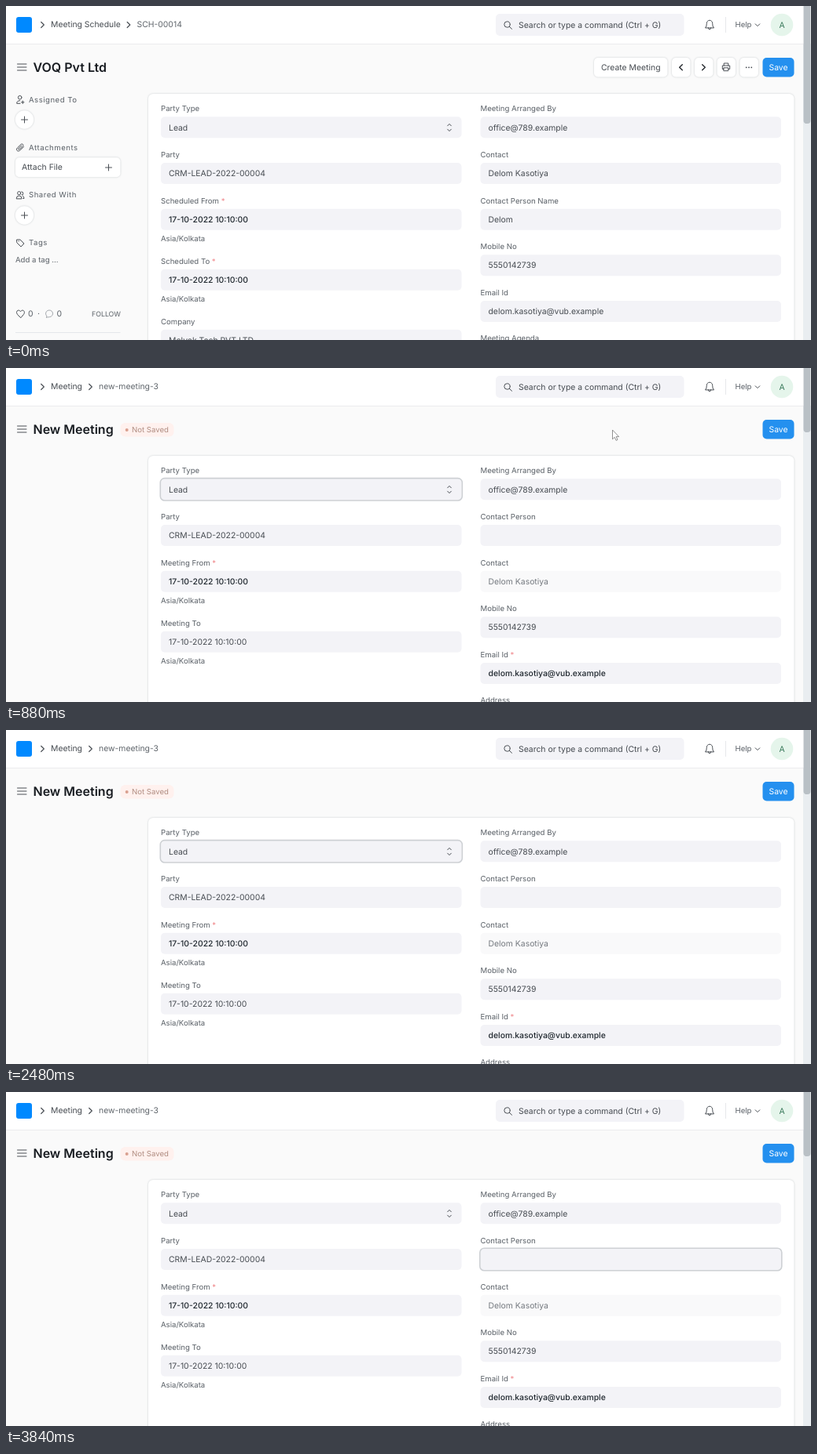
Recreate the animation shown at these times as an HTML page. Size 1024 px wide and 426 px high, loop 3.92 s.

```html
<!DOCTYPE html>
<html lang="en">
<head>
<meta charset="utf-8">
<title>Create meeting</title>
<style>
  html, body { margin: 0; width: 100%; height: 100%; overflow: hidden; }
  svg { display: block; width: 1024px; height: 426px; background: #fafafa; }
  text { font-family: Inter, sans-serif; white-space: pre; text-rendering: geometricPrecision; }
  .icon { fill: none; stroke: #4a4f55; stroke-width: 1; stroke-linecap: round; stroke-linejoin: round; }
  .card { fill: #fff; filter: drop-shadow(0 .5px 1px rgba(25, 39, 52, .22)); }
  .ring { fill: none; stroke: #cdd0d4; stroke-width: 1.6; }
</style>
</head>
<body>
<svg id="stage" viewBox="0 0 1024 426"></svg>
<script>
const LOOP = 3920, PAGE_SWITCH = 800, FOCUS_SWITCH = 3600;
const LEFT = 197, RIGHT = 603.5;
const INK = '#1f272e', BODY = '#464b51', LABEL = '#5a6067', MUTED = '#74797f', FIELD = '#f3f3f7';

// Text is placed by the vertical centre of its capitals.
const text = (x, y, str, size = 10.4, fill = BODY, extra = '') =>
  `<text x="${x}" y="${y + size * .36}" font-size="${size}" fill="${fill}" ${extra}>${str}</text>`;
const rect = (x, y, w, h, r, fill) =>
  `<rect x="${x}" y="${y}" width="${w}" height="${h}" rx="${r}" fill="${fill}"/>`;
const icon = (x, y, d, style = '') =>
  `<path class="icon" transform="translate(${x} ${y})" d="${d}" style="${style}"/>`;
const card = (x, y, w, h, r = 5) => `<rect class="card" x="${x}" y="${y}" width="${w}" height="${h}" rx="${r}"/>`;
const plus = (x, y) => icon(x, y, 'M-4 0H4M0-4V4');
const chevron = (x, y, dir = 1, style = 'stroke-width:1.2') =>
  icon(x, y, `M${-dir * 1.8}-3.5L${dir * 1.8} 0L${-dir * 1.8} 3.5`, style);
const title = str => text(34.5, 78, str, 16, '#171b20', 'font-weight="600"');

function label(x, y, str) {
  const html = str.replace('*', '<tspan fill="#f08a8e">*</tspan>');
  return text(x, y, html, 9.6, LABEL);
}

function field(x, y, name, value, { ink = BODY, fill = FIELD, note = '' } = {}) {
  return label(x, y - 10.7, name) + rect(x, y, 382.5, 27, 5, fill) +
    text(x + 10, y + 13.5, value, 10.4, ink, ink === INK ? 'font-weight="500"' : '') +
    (note && text(x, y + 37.3, note, 9.6, LABEL));
}

const ring = (id, x, y) => `<rect id="${id}" class="ring" x="${x - .7}" y="${y - .7}" width="384" height="28.4" rx="5.5"/>`;

function breadcrumbs(parent, page, pageX) {
  return text(57, 23.7, parent) + chevron(pageX - 10.5, 24) + text(pageX, 23.7, page, 10.4, '#5f656b');
}

const scrollThumb = h => rect(1014.5, -5, 9, h + 5, 4, '#b9c0c5');

function header() {
  return rect(0, 0, 1024, 48, 0, '#fff') + rect(0, 48, 1014, 1, 0, '#ececee') +
    rect(13, 14, 20, 20, 3, '#0089ff') + chevron(46.5, 24) +
    rect(623, 10, 239.5, 28, 5, FIELD) +
    icon(638, 23.5, 'M3.2 0A3.7 3.7 0 1 1-4.2 0A3.7 3.7 0 1 1 3.2 0M2.3 2.8L5.5 5.8') +
    text(652, 24, 'Search or type a command (Ctrl + G)') +
    icon(895, 24, 'M-5.2 3.7Q-3.7 2.5-3.7-1.5C-3.7-7.2 3.7-7.2 3.7-1.5Q3.7 2.5 5.2 3.7ZM-1.6 3.8Q-1.5 6 0 6T1.6 3.8') +
    rect(915, 14, 1, 20, 0, '#e6e8eb') + text(927.5, 24, 'Help', 9.6, LABEL) +
    icon(956, 24.3, 'M-2.8-1.4L0 1.4L2.8-1.4') +
    '<circle cx="987" cy="24" r="14.3" fill="#e5f5eb"/>' +
    text(987, 24.2, 'A', 10.4, '#38785a', 'text-anchor="middle"') +
    icon(20, 78, 'M-5.5-4H6M-5.5 0H6M-5.5 4H6');
}

function save() {
  return rect(962.5, 66, 40, 24.5, 5, '#2490ef') + text(982.5, 78, 'Save', 10.4, '#fff', 'text-anchor="middle"');
}

function toolbar() {
  const bold = 'stroke:#25292e;stroke-width:1.4';
  return card(748, 66, 93.5, 24.5) + text(757, 78, 'Create Meeting') +
    [847, 876, 904.5, 933.5].map(x => card(x, 66, 23.5, 24.5)).join('') +
    chevron(858.5, 78.3, -1, bold) + chevron(887.5, 78.3, 1, bold) +
    icon(916, 78, 'M-2.8-2V-5H2.8V-2M-2.8 2.5H-4.7V-2H4.7V2.5H2.8M-2.8 .8H2.8V4.7H-2.8Z') +
    [-3.3, 0, 3.3].map(dx => `<circle cx="${945 + dx}" cy="78.3" r=".9" fill="${BODY}"/>`).join('');
}

function sidebar() {
  const head = (y, str) => text(29, y, str, 9.6, LABEL, 'letter-spacing=".5"');
  const addButton = y => `<circle class="card" cx="23.5" cy="${y}" r="11.7"/>` + plus(23.5, y);
  return head(119.5, 'Assigned To') + head(180.5, 'Attachments') + head(241, 'Shared With') + head(302, 'Tags') +
    icon(18, 119.5, 'M2-2.8A2.3 2.3 0 1 1-2.6-2.8A2.3 2.3 0 1 1 2 -2.8M0 4.8H-4.3Q-4.3 1.2-.3 1.2M1.5 3.3H5M3.3 1.5V5') +
    icon(18, 180.5, 'M4.5-1L-.5 3.8C-3 6-6 3-3.7 .6L1-4C3-5.6 5-3.2 3.3-1.6L-.8 2.3C-2 3.2-3 2-2 1L1.8-2.5') +
    icon(18, 241, 'M.8-2.3A2.1 2.1 0 1 1-3.4-2.3A2.1 2.1 0 1 1 .8-2.3M-4.8 4.5Q-4.8 1-1.3 1T2 4.5ZM1.8-4.2Q4.2-4 3.8-1.5T2-.2M3.3 1Q5 2 5 4.5H3.8') +
    icon(18, 302, 'M-4-4H0L5 1L1 5L-4 0ZM-1.8-2.2V-1.8') +
    addButton(145) + addButton(267) +
    card(12, 193.3, 133.5, 25) + text(20, 205.7, 'Attach File') + plus(130.5, 206) +
    text(12, 323.5, 'Add a tag ...', 9.6, LABEL) +
    icon(18.5, 392.5, 'M0 5L-4 .8C-7-3-2.5-6.5 0-2.8C2.5-6.5 7-3 4 .8Z') +
    text(28, 392.5, '0', 10.4, LABEL) + text(40, 392.5, '·', 10.4, LABEL) +
    icon(55, 392.5, 'M-3.5 4.5L-3.2 2.8A4.5 4.3 0 1 1 .4 4.1Q-1.2 4.5-3.5 4.5Z', 'stroke:#a3a7ac') +
    text(64.5, 392.5, '0', 10.4, LABEL) + text(109, 392.5, 'FOLLOW', 8.8, LABEL) +
    rect(12, 416, 133.5, 1, 0, '#e4e7ea');
}

// Parts of the form that both documents share.
function form() {
  return card(181, 112, 821.5, 330, 6) +
    field(LEFT, 141.3, 'Party Type', 'Lead') +
    icon(564, 155, 'M-2.3-2.2L0-4.6L2.3-2.2M-2.3 2.2L0 4.6L2.3 2.2') +
    field(LEFT, 200, 'Party', 'CRM-LEAD-2022-00004') +
    field(RIGHT, 141.3, 'Meeting Arranged By', 'office@789.example') +
    field(RIGHT, 317.2, 'Mobile No', '5550142739');
}

function schedulePage() {
  const when = '17-10-2022 10:10:00', note = 'Asia/Kolkata';
  return breadcrumbs('Meeting Schedule', 'SCH-00014', 166.5) + title('VOQ Pvt Ltd') + toolbar() + sidebar() +
    field(LEFT, 258.8, 'Scheduled From *', when, { ink: INK, note }) +
    field(LEFT, 335.8, 'Scheduled To *', when, { ink: INK, note }) +
    field(LEFT, 412.8, 'Company', 'Molvek Tech PVT LTD') +
    field(RIGHT, 200, 'Contact', 'Delom Kasotiya') +
    field(RIGHT, 258.8, 'Contact Person Name', 'Delom') +
    field(RIGHT, 376, 'Email Id', 'delom.kasotiya@vub.example') +
    label(RIGHT, 423.5, 'Meeting Agenda') + scrollThumb(150);
}

function meetingPage() {
  const when = '17-10-2022 10:10:00', note = 'Asia/Kolkata';
  return breadcrumbs('Meeting', 'new-meeting-3', 118) + title('New Meeting') +
    rect(145.5, 70, 68, 17.5, 6, '#fff1ee') + '<circle cx="153.7" cy="79" r="2" fill="#d9a08f"/>' +
    text(160, 79, 'Not Saved', 9.6, '#b08d82') +
    field(LEFT, 258.8, 'Meeting From *', when, { ink: INK, note }) +
    field(LEFT, 335.8, 'Meeting To', when, { note }) +
    field(RIGHT, 200, 'Contact Person', '') +
    field(RIGHT, 258.8, 'Contact', 'Delom Kasotiya', { ink: MUTED, fill: '#f9f9fa' }) +
    field(RIGHT, 376, 'Email Id *', 'delom.kasotiya@vub.example', { ink: INK }) +
    label(RIGHT, 423.5, 'Address') + scrollThumb(82) +
    ring('typeRing', LEFT, 141.3) + ring('personRing', RIGHT, 200);
}

const cursors = `<g id="cursor" fill="#fff" stroke="#777" stroke-width=".8" stroke-linejoin="round">
  <path id="hand" d="M-1.2 7V1Q0-.8 1.2 1V5Q2.6 4 3.6 5.3Q5 4.5 5.8 5.8Q7.6 5.3 7.6 7.2V10Q7.6 12 6.2 14H0Q-1 11.8-4.2 8.6Q-4.3 6.6-1.2 8.4Z"/>
  <path id="arrow" d="M0 0V11.8L2.7 9.3L4.6 13.4L6.5 12.5L4.7 8.6H8.2Z"/></g>`;

const stage = document.getElementById('stage');
stage.innerHTML = rect(1014, 0, 10, 426, 0, '#e9edf0') + header() + save() + form() +
  `<g id="schedule">${schedulePage()}</g><g id="meeting">${meetingPage()}</g>` + cursors;

const show = (id, on) => stage.getElementById(id).setAttribute('visibility', on ? 'visible' : 'hidden');

// Pointer stops: time, x, y.
const stops = [[160, 740, 430], [480, 771.5, 79], [960, 771.5, 79], [1360, 500.8, 157], [1680, 500.8, 157], [1920, 480, 430]];

function pointerAt(time) {
  const next = stops.findIndex(stop => stop[0] > time);
  if (next < 1) return [0, 440];
  const [t0, x0, y0] = stops[next - 1], [t1, x1, y1] = stops[next];
  const p = (time - t0) / (t1 - t0), eased = p * p * (3 - 2 * p);
  return [x0 + (x1 - x0) * eased, y0 + (y1 - y0) * eased];
}

function draw(now) {
  const time = now % LOOP, onMeeting = time >= PAGE_SWITCH;
  show('schedule', !onMeeting);
  show('meeting', onMeeting);
  show('typeRing', onMeeting && time < FOCUS_SWITCH);
  show('personRing', time >= FOCUS_SWITCH);
  const [x, y] = pointerAt(time);
  const overButton = !onMeeting && x > 748 && x < 842 && y > 66 && y < 91;
  show('hand', overButton);
  show('arrow', !overButton);
  stage.getElementById('cursor').setAttribute('transform', `translate(${x} ${y})`);
  requestAnimationFrame(draw);
}
requestAnimationFrame(draw);
</script>
</body>
</html>
```
